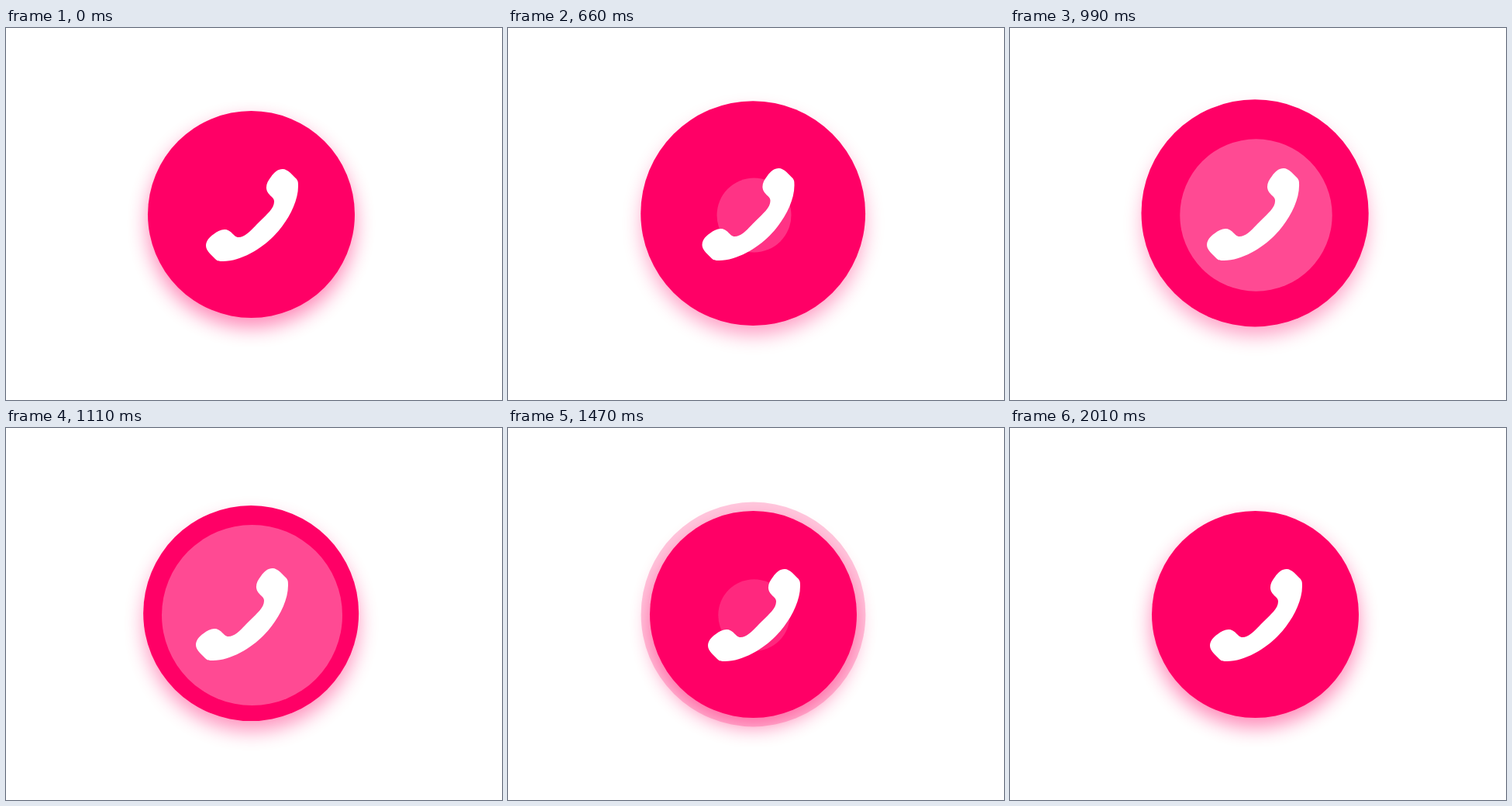
An HTML page that plays this animation: 640x480 px, repeating every 2.4 s.

```html
<!DOCTYPE html>
<html lang="en">
<head>
<meta charset="utf-8">
<title>Ringing call button</title>
<style>
  html, body { margin: 0; width: 100%; height: 100%; overflow: hidden; background: #fff; }
  svg { display: block; width: 100%; height: 100%; }
</style>
</head>
<body>
<svg viewBox="0 0 640 480">
  <defs>
    <filter id="soft" x="-40%" y="-40%" width="180%" height="180%" color-interpolation-filters="sRGB">
      <feGaussianBlur stdDeviation="13"/>
    </filter>
  </defs>
  <rect width="640" height="480" fill="#fff"/>
  <circle id="shadow" fill="#f06" filter="url(#soft)"/>
  <circle id="wave" cx="316.5" cy="240.5" fill="#f06"/>
  <circle id="button" fill="#f06"/>
  <circle id="disc" cx="317.5" cy="241.5" fill="#fff"/>
  <path id="phone" fill="#fff" d="M280 301 C303 301 329 285 345 269 C361 253 377 227 377 204
    C377 199 377 197 374 194 L367 187 C364 184 360 182 357 182 C351 182 346 186 342 192
    C338 197 335.5 202 336 207 C336.5 212 340 215 344 219 C345.5 221 346 222 346 224
    C346 233 337 240 326.5 250.5 C316 261 309 270 300 270 C298 270 297 269.500 295 268
    C291 264 288 260.500 283 260 C278 259.500 273 262 268 266 C262 270 258 275 258 281
    C258 284 260 288 263 291 L270 298 C273 301 275 301 280 301 Z"/>
</svg>
<script>
  const LOOP = 2400, STEP = 30, BASE = 133.5;
  const part = id => document.getElementById(id);
  const [shadow, wave, button, disc, phone] =
    ['shadow', 'wave', 'button', 'disc', 'phone'].map(part);

  const set = (el, attrs) => {
    for (const name in attrs) el.setAttribute(name, attrs[name]);
  };

  // Piecewise linear value through [time, value] stops
  function track(t, ...stops) {
    if (t <= stops[0][0]) return stops[0][1];
    for (let i = 1; i < stops.length; i++) {
      const [t0, v0] = stops[i - 1], [t1, v1] = stops[i];
      if (t <= t1) return v0 + (v1 - v0) * (t - t0) / (t1 - t0);
    }
    return stops[stops.length - 1][1];
  }

  function draw(t) {
    const grow = track(t, [288, 0], [900, 18.8], [1110, 5.5], [1200, 0]);
    const lift = track(t, [288, 0], [840, 2], [1110, 1.4], [1230, 0]);
    set(button, { cx: 316.5 - lift / 4, cy: 240.5 - lift, r: BASE + grow });
    set(shadow, {
      cx: 316.5, cy: 252.5, r: BASE + grow * 0.8,
      opacity: 0.47 - grow * 0.007
    });

    set(disc, {
      r: track(t, [345, 0], [1110, 116.5], [1707, 0]),
      opacity: track(t, [345, 0], [800, 0.29], [1320, 0.29], [1650, 0])
    });

    set(wave, {
      r: BASE + track(t, [1300, 0], [1800, 33.5], [2010, 38]),
      opacity: track(t, [1300, 0.3], [1930, 0])
    });
    wave.style.display = t < 1300 ? 'none' : '';

    const shift = track(t, [210, 0], [300, 1], [1200, 1], [1290, 0]);
    const ringing = t > 435 && t < 1245;
    const sway = ringing ? 11 * Math.cos((t - 840) / 540 * 2 * Math.PI) : 0;
    set(phone, { transform: `translate(${sway - 2 * shift} ${-shift})` });
  }

  const start = performance.now();
  function tick() {
    const t = (performance.now() - start) % LOOP;
    draw(Math.floor(t / STEP) * STEP);
    requestAnimationFrame(tick);
  }
  draw(0);
  requestAnimationFrame(tick);
</script>
</body>
</html>
```
